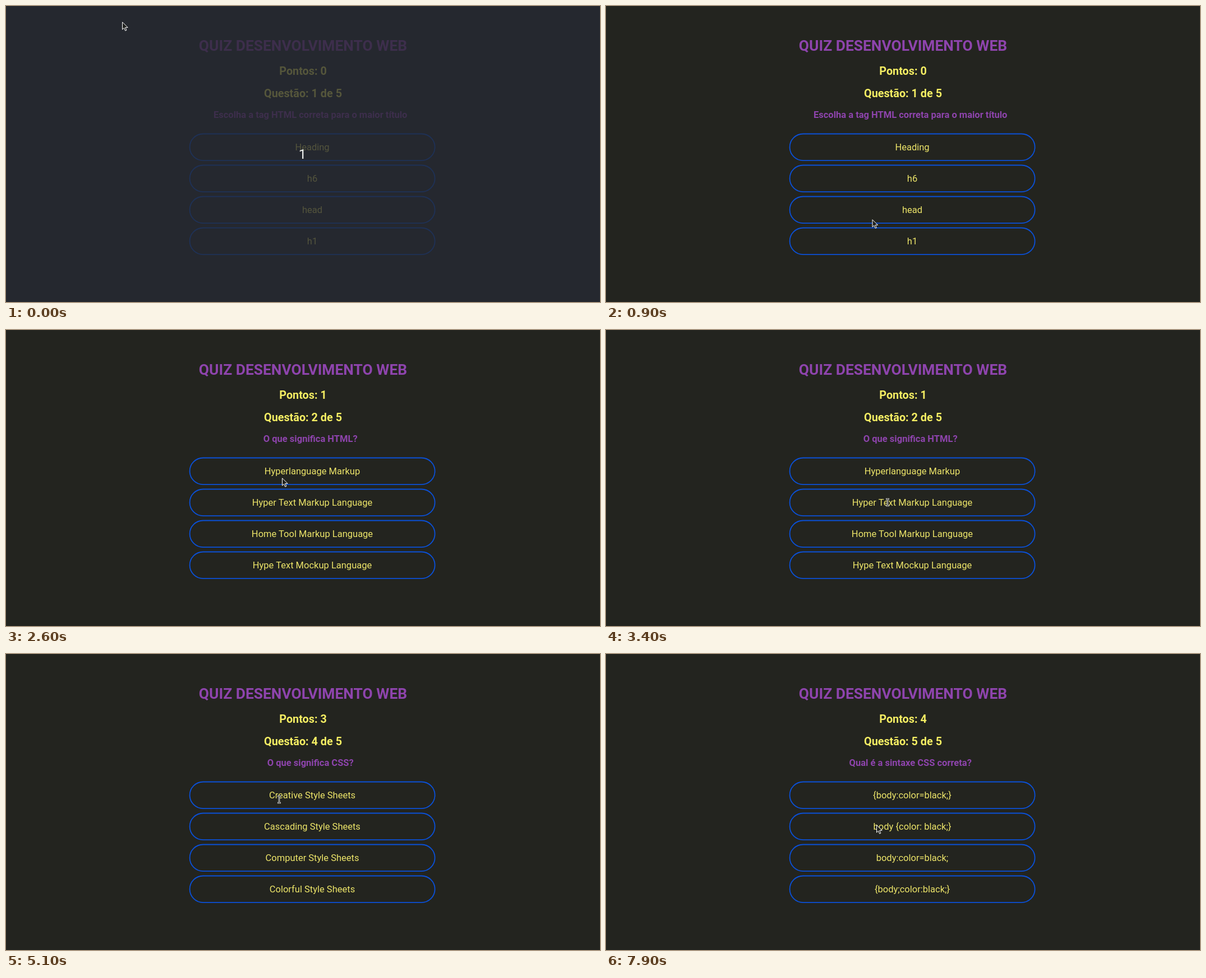
Write an HTML page that moves like this. It is 1059 px wide and 529 px high and loops after 8000 ms.

```html
<!DOCTYPE html>
<html lang="pt">
<head>
<meta charset="utf-8">
<style>
  html, body { margin: 0; height: 100%; overflow: hidden; background: #23241f; }
  svg { display: block; width: 1059px; height: 529px; font: 16.5px Roboto, sans-serif; text-anchor: middle; }
  text { fill: #ede569; }
  .bold { font-weight: 700; }
  .info { font-size: 19.8px; fill: #f5ee63; }
  .purple { fill: #8e44ad; }
  .title { font-size: 26.4px; }
  .box { fill: none; stroke: #0a50d8; stroke-width: 1.8; }
  #count { font-size: 24px; fill: #f2f4f2; }
</style>
</head>
<body>
<svg viewBox="0 0 1059 529">
  <rect id="back" width="1059" height="529"/>
  <g id="quiz">
    <text class="bold purple title" x="529.5" y="80.4">QUIZ DESENVOLVIMENTO WEB</text>
    <text id="points" class="bold info" x="529.5" y="123"/>
    <text id="number" class="bold info" x="529.5" y="163.4"/>
    <text id="question" class="bold purple" x="542.7" y="200.3"/>
  </g>
  <text id="count" x="528.5" y="273">1</text>
  <path id="arrow" d="M.5.8v13.2l3-2.8 2.2 5 2.2-1-2.2-4.8h4.4z" fill="#20211e" stroke="#fff"/>
  <g id="beam" fill="none">
    <path d="M-3-6H3M-3 6H3M0-6V6" stroke="#e4e4e4" stroke-width="2.6"/>
    <path d="M-2.5-6H2.5M-2.5 6H2.5M0-6V6" stroke="#23241f" stroke-width=".9"/>
  </g>
</svg>
<script>
const LOOP = 8000, STEP = 100;
const $ = id => document.getElementById(id);
const show = (id, on) => $(id).setAttribute('visibility', on ? 'visible' : 'hidden');

const screens = [
  { start: 0, question: 'Escolha a tag HTML correta para o maior título',
    options: ['Heading', 'h6', 'head', 'h1'] },
  { start: 1600, question: 'O que significa HTML?',
    options: ['Hyperlanguage Markup', 'Hyper Text Markup Language',
      'Home Tool Markup Language', 'Hype Text Mockup Language'] },
  { start: 3600, question: 'Qual é a tag HTML correta para inserir uma quebra de linha?',
    options: ['br', 'lb', 'break', 'hr'] },
  { start: 5100, question: 'O que significa CSS?',
    options: ['Creative', 'Cascading', 'Computer', 'Colorful'].map(w => w + ' Style Sheets') },
  { start: 6400, question: 'Qual é a sintaxe CSS correta?',
    options: ['{body:color=black;}', 'body {color: black;}', 'body:color=black;', '{body;color:black;}'] }
];

// The pointer rests between eased moves.
const home = { x: 207, y: 28 };
const moves = [
  { from: 100, to: 200, x: 217, y: 30 },
  { from: 400, to: 900, x: 474.5, y: 381 },
  { from: 900, to: 1400, x: 514.5, y: 412.5 },
  { from: 2000, to: 2600, x: 492, y: 264 },
  { from: 2700, to: 3400, x: 502, y: 308 },
  { from: 4000, to: 4400, x: 509, y: 344 },
  { from: 4400, to: 4800, x: 487, y: 260 },
  { from: 5600, to: 6100, x: 486, y: 318 },
  { from: 7200, to: 7300, x: 482, y: 310 },
  { from: 7500, to: 7600, x: 500, y: 308 },
  { from: 7800, to: 7900, x: 482, y: 305 }
];

const answers = [0, 1, 2, 3].map(i => {
  const y = 56 * i;
  $('quiz').insertAdjacentHTML('beforeend',
    `<rect class="box" x="327.6" y="${228.5 + y}" width="437" height="47.6" rx="23.8"/>
     <text x="546" y="${258 + y}"></text>`);
  return $('quiz').lastElementChild;
});

function pointerAt(t) {
  let { x, y } = home;
  for (const m of moves) {
    const k = Math.min(1, Math.max(0, (t - m.from) / (m.to - m.from)));
    const ease = k * k * (3 - 2 * k);
    x += (m.x - x) * ease;
    y += (m.y - y) * ease;
  }
  return { x, y };
}

// The pointer turns into a beam just inside the edges of an answer's text.
function overText({ x, y }) {
  return answers.some(a => {
    const b = a.getBBox();
    return Math.abs(x - b.x - b.width / 2) < b.width / 2 - 6 &&
           Math.abs(y - b.y - b.height / 2) < b.height / 2 - 1;
  });
}

let shown = -1;
function showScreen(n) {
  if (n === shown) return;
  shown = n;
  $('points').textContent = `Pontos: ${n}`;
  $('number').textContent = `Questão: ${n + 1} de 5`;
  $('question').textContent = screens[n].question;
  answers.forEach((a, i) => a.textContent = screens[n].options[i]);
}

function draw() {
  const t = Math.floor(performance.now() % LOOP / STEP) * STEP;
  const counting = t < 100;
  showScreen(screens.filter(s => s.start <= t).length - 1);
  $('back').setAttribute('fill', counting ? '#25282f' : '#23241f');
  $('quiz').setAttribute('opacity', counting ? .23 : 1);
  show('count', counting);

  const pointer = pointerAt(t), beam = overText(pointer);
  for (const id of ['arrow', 'beam'])
    $(id).setAttribute('transform', `translate(${pointer.x} ${pointer.y})`);
  show('arrow', !beam);
  show('beam', beam);
  requestAnimationFrame(draw);
}
draw();
</script>
</body>
</html>
```
